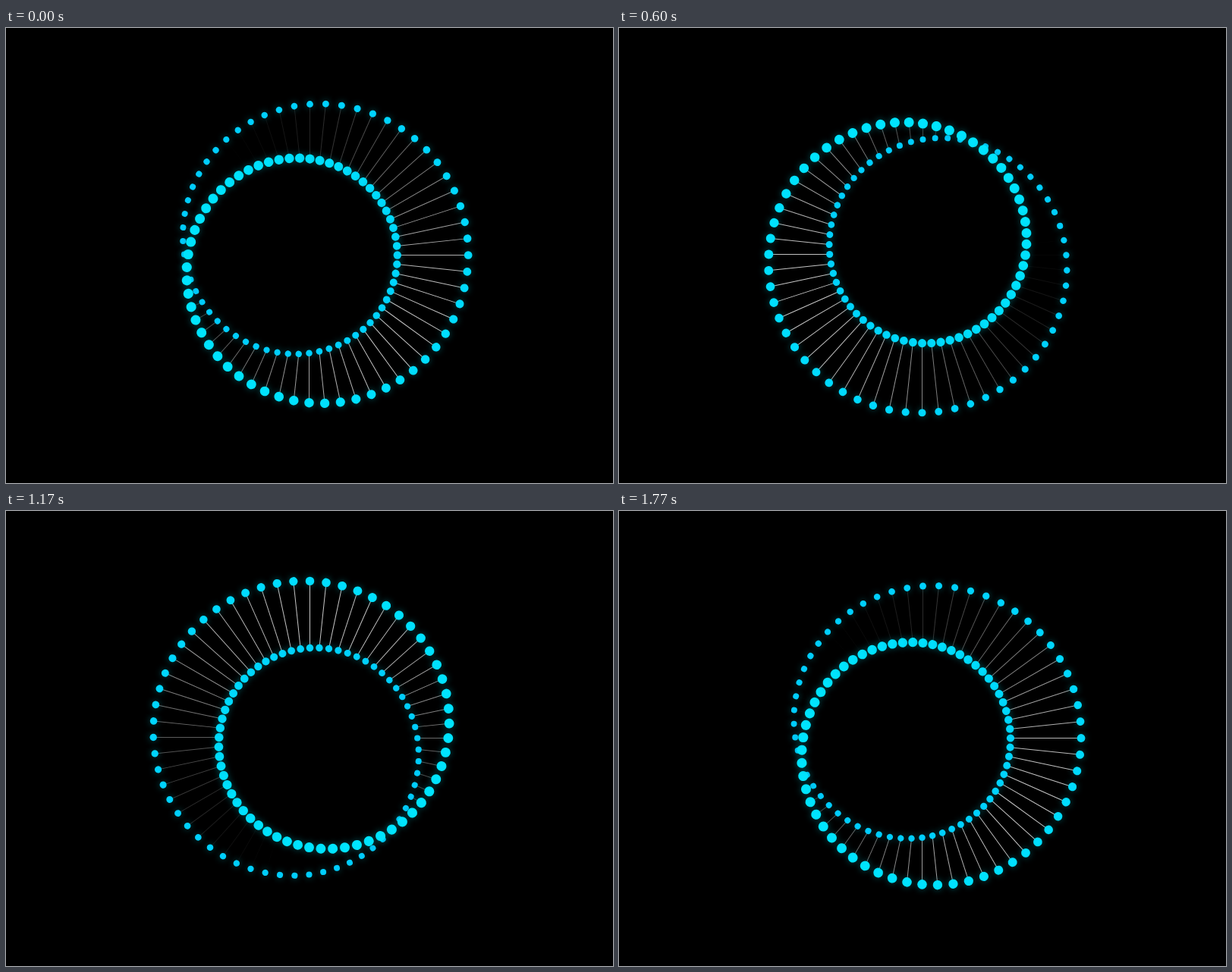
These frames come from a looping animation (800x600 px, 1.8 s). An HTML page with a canvas:

```html
<!DOCTYPE html>
<html>
<head>
<meta charset="utf-8">
<title>Twisting ring</title>
<style>
html, body { margin: 0; width: 100%; height: 100%; overflow: hidden; background: #000; }
canvas { display: block; }
</style>
</head>
<body>
<canvas id="stage" width="800" height="600"></canvas>
<script>
const ctx = document.getElementById('stage').getContext('2d');
const LOOP = 1800, STRANDS = 60, RADIUS = 162.5, REACH = 47.7;
const RAD = Math.PI / 180;

// Radial swing of a bead, slightly steeper at the middle than a plain cosine
const swing = p => REACH * (Math.cos(p) - 0.02 * Math.cos(3 * p));

function bead(x, depth) {
  ctx.fillStyle = `rgb(0, ${Math.round(217 + 12 * depth)}, 255)`;
  ctx.beginPath();
  ctx.arc(x, 0.5, 5.25 + 1.3 * depth, 0, 2 * Math.PI);
  ctx.fill();
}

function strand(angle, phase) {
  const offset = swing(phase), depth = Math.sin(phase);
  const light = 0.5 + 0.5 * Math.cos(2 * (phase - 23 * RAD));
  ctx.save();
  ctx.translate(400, 299);
  ctx.rotate(angle);

  ctx.fillStyle = `rgba(255, 255, 255, ${0.78 * light})`;
  ctx.fillRect(RADIUS - Math.abs(offset), 0, 2 * Math.abs(offset), 1);

  ctx.shadowColor = 'rgba(0, 150, 160, 0.55)';
  ctx.shadowBlur = 10;
  const front = Math.sign(depth) || 1;
  for (const side of [-front, front]) bead(RADIUS + side * offset, side * depth);
  ctx.restore();
}

function draw(now) {
  const turn = (now % LOOP) / LOOP * Math.PI;
  ctx.fillStyle = '#000';
  ctx.fillRect(0, 0, 800, 600);
  for (let i = 0; i < STRANDS; i++) {
    const angle = i / STRANDS * 2 * Math.PI;
    strand(angle, angle / 2 + 3 * RAD - turn);
  }
}

let start;
function tick(now) {
  start ??= now;
  draw(now - start);
  requestAnimationFrame(tick);
}
draw(0);
requestAnimationFrame(tick);
</script>
</body>
</html>
```
